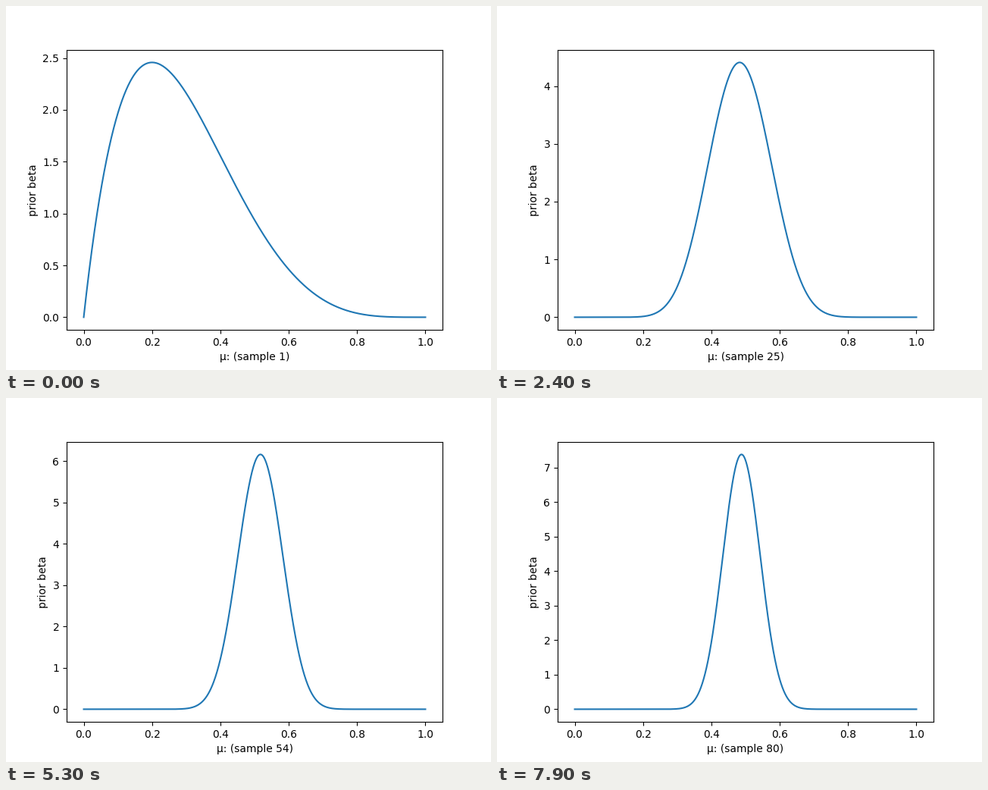
A matplotlib script that plays this animation: 640x480 px, repeating every 8000 ms.

```python
from math import comb

import matplotlib.pyplot as plt
import numpy as np
from matplotlib.animation import FuncAnimation

SAMPLES = 80
INTERVAL = 100  # ms per sample

# Running count of successes, given at a few samples and filled in between.
KNOTS = [(1, 1), (8, 3), (15, 7), (25, 14), (30, 18), (38, 23),
         (46, 26), (54, 30), (65, 36), (66, 36), (80, 41)]
hits = np.floor(np.interp(np.arange(1, SAMPLES + 1), *zip(*KNOTS)) + 0.5)

x = np.linspace(0, 1, 1000)


def beta_pdf(wins, losses):
    """Density of Beta(wins + 1, losses + 1) over x."""
    total = wins + losses
    return (total + 1) * comb(total, wins) * x**wins * (1 - x)**losses


fig, ax = plt.subplots(figsize=(6.4, 4.8), dpi=100)
line, = ax.plot(x, np.zeros_like(x), color="tab:blue", lw=1.5)
ax.set_ylabel("prior beta")


def update(i):
    sample = i + 1
    wins = int(hits[i])
    line.set_ydata(beta_pdf(wins, sample + 4 - wins))
    ax.relim()
    ax.autoscale_view()
    ax.set_xlabel(f"μ: (sample {sample})")
    return line,


anim = FuncAnimation(fig, update, frames=SAMPLES, interval=INTERVAL,
                     repeat=True, repeat_delay=0, blit=False)
plt.show()
```
